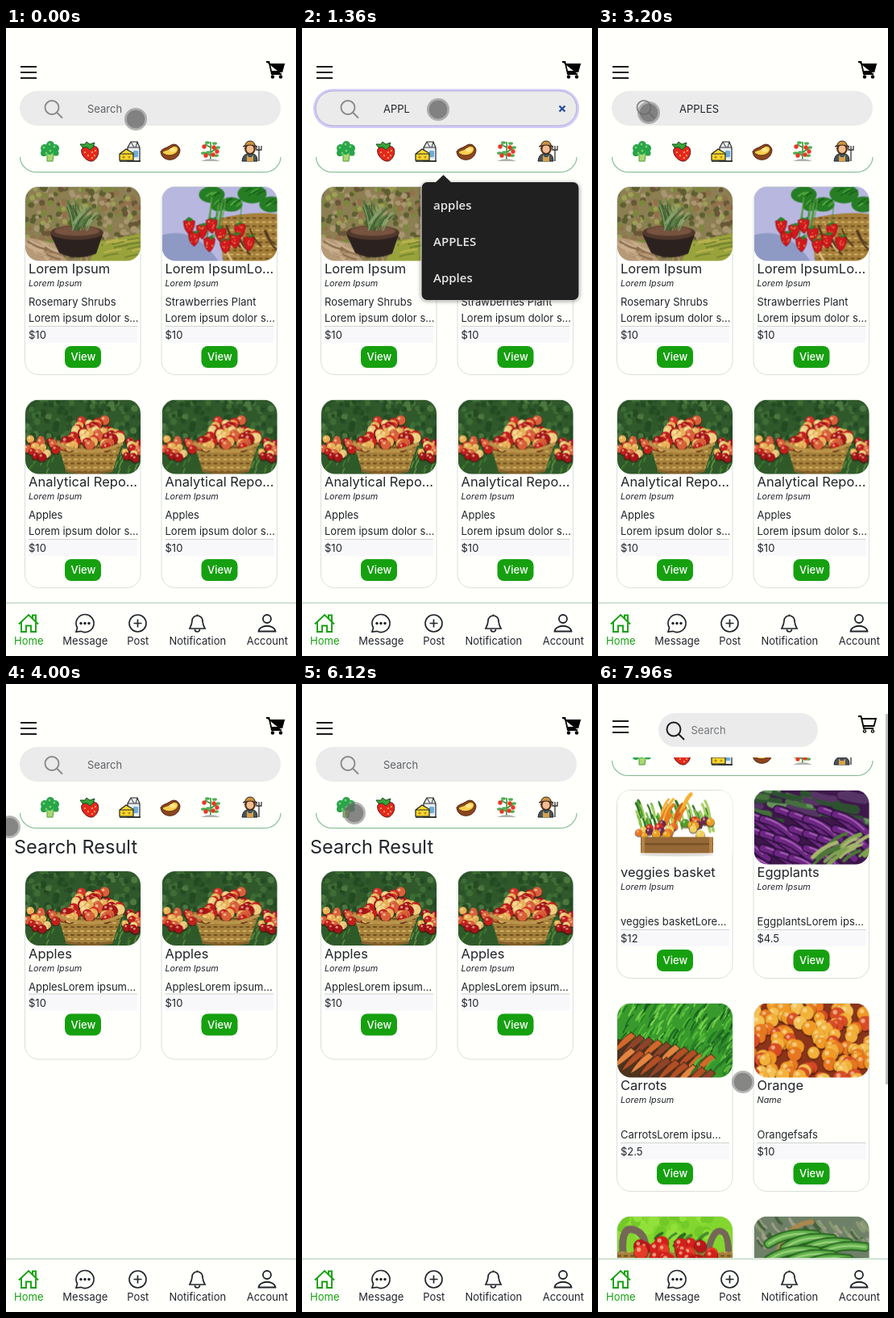
An HTML page with a canvas for the animation above (8 s loop, 360x778 px).

```html
<!DOCTYPE html>
<html lang="en">
<head>
<meta charset="utf-8">
<title>Market app search</title>
<style>
html, body { margin: 0; width: 100%; height: 100%; overflow: hidden; background: #fffffc; }
canvas { display: block; width: 360px; height: 778px; }
</style>
</head>
<body>
<canvas id="stage" width="360" height="778"></canvas>
<script>
const LOOP = 8000, BG = '#fffffc', INK = '#212529', GREEN = '#16a010';
const UI = 'Inter, Roboto, sans-serif';
const g = document.getElementById('stage').getContext('2d');

// ---- helpers
let seed = 1;
const rnd = () => (seed = (seed * 16807) % 2147483647) / 2147483647;
const pick = list => list[Math.floor(rnd() * list.length)];

function text(s, x, y, size, color = INK, style = '', family = UI) {
  g.font = `${style} ${size}px ${family}`;
  g.fillStyle = color;
  g.fillText(s, x, y);
}
function box(c, x, y, w, h, r, fill, stroke, lw = 1) {
  c.beginPath();
  c.roundRect(x, y, w, h, r);
  if (fill) { c.fillStyle = fill; c.fill(); }
  if (stroke) { c.strokeStyle = stroke; c.lineWidth = lw; c.stroke(); }
}
function shape(c, d, fill, stroke, lw = 1) {
  const p = new Path2D(d);
  if (fill) { c.fillStyle = fill; c.fill(p); }
  if (stroke) { c.strokeStyle = stroke; c.lineWidth = lw; c.stroke(p); }
}
function dot(c, x, y, r, fill, ry = r) {
  c.beginPath();
  c.ellipse(x, y, r, ry, 0, 0, 7);
  c.fillStyle = fill;
  c.fill();
}
function at(x, y, fn) {
  g.save();
  g.translate(x, y);
  fn(g);
  g.restore();
}

// ---- pictures, 143 x 92
function spots(c, n, x, y, w, h, r, cols) {
  for (let i = 0; i < n; i++) dot(c, x + rnd() * w, y + rnd() * h, r * (.7 + rnd() * .5), pick(cols));
}
function fruit(c, n, x, y, w, h, r, cols) {
  for (let i = 0; i < n; i++) {
    const px = x + rnd() * w, py = y + h * (i + rnd()) / n, s = r * (.85 + rnd() * .3);
    dot(c, px, py + 1, s + .6, 'rgba(50,10,5,.55)');
    dot(c, px, py, s, pick(cols));
    dot(c, px - s * .3, py - s * .35, s * .3, 'rgba(255,235,190,.6)');
  }
}
function streaks(c, n, x, y, w, h, dx, dy, lw, cols) {
  c.lineCap = 'round';
  for (let i = 0; i < n; i++) {
    const px = x + rnd() * w, py = y + rnd() * h, k = .6 + rnd() * .7;
    c.strokeStyle = pick(cols);
    c.lineWidth = lw * (.6 + rnd() * .6);
    c.beginPath();
    c.moveTo(px, py);
    c.quadraticCurveTo(px + dx * k * .4, py + dy * k * .7, px + dx * k, py + dy * k);
    c.stroke();
  }
}
function weave(c, d) {
  c.save();
  shape(c, d, '#a5803a');
  c.clip(new Path2D(d));
  for (let y = 38; y < 94; y += 5)
    for (let x = (y % 2) * 4; x < 146; x += 8) box(c, x, y, 5, 2, 1, y % 2 ? '#d0b064' : '#70501f');
  c.restore();
}
function picture(base, paint) {
  const cv = document.createElement('canvas');
  cv.width = 143; cv.height = 92;
  const c = cv.getContext('2d');
  seed = 4211;
  c.fillStyle = base;
  c.fillRect(0, 0, 143, 92);
  paint(c);
  return cv;
}

const REDS = ['#c41f1c', '#d8322a', '#a81418', '#e9b257', '#d9603a', '#f0cd7d'];
const PICS = {
  rosemary: picture('#8c7f53', c => {
    spots(c, 330, 0, 0, 143, 92, 3.4, ['#7c873d', '#a89670', '#5b5f31', '#93714c', '#9da055', '#695638']);
    shape(c, 'M0 62L34 70L52 92H0Z', '#b69a78');
    streaks(c, 18, 0, 64, 30, 26, 18, 8, 2, ['#c9b08e', '#8c6d4d']);
    shape(c, 'M92 68L143 58V92H80Z', '#99a33c');
    streaks(c, 16, 92, 66, 45, 24, 20, -4, 2, ['#c2b654', '#6d7f2d']);
    shape(c, 'M31 59Q64 70 96 59L88 83Q64 93 42 82Z', '#2b211f');
    dot(c, 64, 57, 33, '#51382c', 9);
    dot(c, 64, 55, 28, '#775340', 6);
    streaks(c, 34, 58, 44, 20, 11, -6, -25, 1.6, ['#587a43', '#7b9a5f', '#3f5e33']);
    streaks(c, 22, 58, 44, 20, 11, 14, -18, 1.5, ['#587a43', '#8ba36d', '#3f5e33']);
  }),
  berries: picture('#b7b7df', c => {
    shape(c, 'M0 60Q40 48 70 92H0Z', '#8e99c4');
    weave(c, 'M70 40Q110 30 143 34V92H76Z');
    streaks(c, 9, 78, 45, 55, 35, 16, 24, 2, ['#e0c28a', '#4c351d']);
    for (const [x, y, r] of [[62, 10, 16], [86, 22, 14], [112, 9, 18], [136, 22, 15], [70, 24, 10]]) {
      dot(c, x, y, r, '#267d24', r * .65);
      streaks(c, 5, x - r / 2, y - 3, r, 6, r * .5, -5, 1.5, ['#5db845', '#155819']);
    }
    streaks(c, 9, 40, 12, 70, 14, -6, 38, 1.5, ['#3e8f30', '#5da54d']);
    for (const [x, y] of [[34, 48], [50, 54], [40, 63], [59, 70], [73, 58], [79, 72], [97, 53], [108, 69], [62, 47], [91, 66]]) {
      shape(c, `M${x - 7} ${y - 5}Q${x} ${y - 10} ${x + 7} ${y - 5}Q${x + 6} ${y + 7} ${x} ${y + 11}Q${x - 7} ${y + 6} ${x - 7} ${y - 5}Z`, '#d0181d', '#8f1017', .8);
      spots(c, 6, x - 4, y - 4, 8, 10, .8, ['#f0a15d']);
      streaks(c, 3, x - 5, y - 7, 8, 2, 3, -2, 2, ['#2b8428']);
    }
  }),
  apples: picture('#30592b', c => {
    spots(c, 150, 0, 0, 143, 48, 3.5, ['#244a22', '#3d6c34', '#28522a', '#4c7840']);
    streaks(c, 90, 0, 52, 143, 40, 3, -7, 1.6, ['#437f2d', '#2b5e22', '#5c9140']);
    fruit(c, 18, 0, 48, 38, 24, 4.8, REDS);
    fruit(c, 13, 120, 50, 23, 24, 4.8, REDS);
    weave(c, 'M39 50Q80 62 121 51L108 89Q80 94 51 90Z');
    fruit(c, 17, 64, 25, 35, 16, 5.7, REDS);
    fruit(c, 36, 43, 37, 74, 22, 5.9, REDS);
    c.lineCap = 'butt';
    shape(c, 'M39 54Q80 74 121 54', null, '#bb944a', 4);
    shape(c, 'M50 88Q80 94 108 88', null, '#81602b', 3);
  }),
  basket: picture('#fffffc', c => {
    streaks(c, 60, 28, 28, 92, 24, -5, -16, 3, ['#4b9c2c', '#7cbc46', '#2d7425', '#a8cf63']);
    streaks(c, 12, 50, 28, 30, 14, 9, -18, 4, ['#e97d20', '#d65b1d', '#f2b238']);
    fruit(c, 24, 24, 37, 92, 20, 5, ['#d92c20', '#e9a022', '#4f9e2c', '#6d2a50', '#f0d05a', '#ed7426']);
    box(c, 29, 58, 90, 20, 1, '#956835');
    box(c, 29, 66, 90, 1.5, 0, '#66441f');
    box(c, 30, 58, 4, 20, 0, '#b58347');
    box(c, 114, 58, 4, 20, 0, '#b58347');
    dot(c, 74, 80, 46, 'rgba(90,80,70,.2)', 2);
  }),
  eggplants: picture('#3f174c', c => {
    streaks(c, 36, -20, -5, 143, 42, 28, 6, 9, ['#45703d', '#639358', '#2d5130', '#563466']);
    for (let i = 0; i < 22; i++) {
      const x = -25 + (i % 8) * 18, y = 24 + Math.floor(i / 8) * 24 + (i % 3) * 6;
      shape(c, `M${x} ${y}Q${x + 20} ${y + 4} ${x + 42} ${y + 25}`, null, '#270f35', 11);
      shape(c, `M${x} ${y}Q${x + 20} ${y + 4} ${x + 42} ${y + 25}`, null, '#6d2683', 8);
      shape(c, `M${x + 4} ${y - 1}Q${x + 20} ${y + 3} ${x + 36} ${y + 19}`, null, '#b370bd', 1.5);
    }
    streaks(c, 16, 72, 64, 70, 28, 26, -16, 5, ['#7fa251', '#4d7838', '#a5b66d']);
  }),
  carrots: picture('#389a2c', c => {
    streaks(c, 190, 0, 0, 143, 75, 8, -12, 2, ['#55bf36', '#227b25', '#7bd24e', '#185e20']);
    shape(c, 'M0 44L95 66L105 92H0Z', '#4c351f');
    for (let i = 0; i < 20; i++) {
      const x = 2 + (i % 10) * 11, y = 44 + (i % 10) * 3 + Math.floor(i / 10) * 19;
      shape(c, `M${x + 15} ${y - 8}L${x + 21} ${y - 3}Q${x + 2} ${y + 14} ${x - 9} ${y + 19}Q${x} ${y + 2} ${x + 15} ${y - 8}Z`, pick(['#d3682a', '#b24f25', '#e48540', '#8f442a']), '#3a2418');
    }
    streaks(c, 30, 92, 50, 50, 38, 10, -10, 3, ['#58b83a', '#27772a']);
  }),
  oranges: picture('#8a341a', c =>
    fruit(c, 120, -4, -5, 150, 102, 8.2, ['#f09a25', '#f3b13a', '#e77820', '#f5c052', '#d94b25'])),
  tomatoes: picture('#83d62d', c => {
    spots(c, 35, 0, 0, 143, 25, 6, ['#92e13b', '#72c927']);
    shape(c, 'M7 46Q4 8 24 18Q38 25 34 50', null, '#756658', 9);
    shape(c, 'M112 46Q120 8 134 22Q139 32 138 55', null, '#756658', 8);
    weave(c, 'M0 44H143V92H0Z');
    streaks(c, 12, 45, 25, 60, 15, 8, -6, 4, ['#296a22', '#498d2c']);
    fruit(c, 42, 28, 32, 90, 48, 8, ['#d3201b', '#b91717', '#e63a28']);
  }),
  cucumbers: picture('#6e8067', c => {
    streaks(c, 45, 0, 0, 143, 30, 8, 10, 4, ['#455f3b', '#a19f87', '#879a72']);
    shape(c, 'M18 92Q28 10 72 7', null, '#aa884d', 6);
    for (let i = 0; i < 14; i++) {
      const x = 18 + (i % 4) * 20, y = 26 + i * 5;
      const d = `M${x} ${y + 8}Q${x + 25} ${y - 9} ${x + 60} ${y - 3}`;
      shape(c, d, null, '#286222', 12);
      shape(c, d, null, '#62b24b', 8);
      shape(c, d, null, '#a3d585', 2);
    }
  })
};

// ---- small icons, centred on 0,0
const FOODS = [
  c => {
    shape(c, 'M-7 0L-3 4L-3 12H4L5 4L9 0Z', '#a9d86e', '#4b9b3e');
    for (const [x, y, r] of [[-6, -4, 5], [1, -8, 5], [7, -4, 5], [-7, 2, 4], [8, 2, 3.6], [0, -1, 5]]) dot(c, x, y, r, '#28a44a');
    for (const [x, y] of [[-7, -5], [0, -9], [6, -6], [1, -1], [-4, 2]]) dot(c, x, y, 1.5, '#72d26c');
  },
  c => {
    shape(c, 'M-10-3C-12 5-3 13 3 12C10 10 13-1 9-5C4-9-7-8-10-3Z', '#e5281f', '#5b1714');
    shape(c, 'M-9-5L-12-9L-6-9L-4-12L0-9L6-11L4-5L0-2L-3-5Z', '#37a338', '#174d1b');
    for (const [x, y] of [[-6, 1], [-2, 5], [3, 1], [7, -1], [3, 8], [6, 5]]) dot(c, x, y, .9, '#ffd268');
  },
  c => {
    shape(c, 'M-3-5L1-12H9L12-5V12H-3Z', '#e9eef0', '#222', 1.2);
    shape(c, 'M-3-5H12M1-12L5-5M9-12L7-5', null, '#333');
    box(c, 4, -1, 6, 8, 1, '#6baed6');
    shape(c, 'M-13 3L-5-3L4 2V11H-13Z', '#f6d82e', '#222', 1.2);
    shape(c, 'M-13 3H4', null, '#222');
    dot(c, -8, 7, 1.8, '#c48e13');
    dot(c, -1, 7, 1.5, '#c48e13');
    shape(c, 'M-13 12H13', null, '#222', 1.5);
  },
  c => {
    shape(c, 'M-12 0C-11 14 11 14 12-2C10-9 5-10 1-8C-5-4-10-4-12 0Z', '#8b461e', '#4a210f');
    shape(c, 'M-10 1C-6 7 8 6 10-3C8-8 4-7 1-5C-3-1-8-2-10 1Z', '#f6cf4d', '#6c3517');
    dot(c, 3, -2, 4, '#ffe58a', 2.5);
  },
  c => {
    shape(c, 'M0 11C-1 3 1-3 0-12M0 5L-8 1M0 1L8-4M0-5L-7-9', null, '#3c923d', 1.6);
    for (const [x, y] of [[-4, -11], [5, -10], [9, -5], [-9, 2], [7, 5], [-3, 1]]) dot(c, x, y, 3, '#4cae4c', 1.8);
    for (const [x, y] of [[-8, -6], [4, -5], [-6, 5], [8, 0], [3, 4]]) dot(c, x, y, 2.7, '#e63a25');
    shape(c, 'M-12 12Q0 6 12 12Z', '#aeb4b0');
  },
  c => {
    dot(c, -1, -4, 7, '#5d3420', 8);
    dot(c, -1, -3, 4.5, '#f0bd91', 5);
    shape(c, 'M-10-6Q-1-10 8-6L5-8Q4-13-1-13Q-6-13-7-8Z', '#c89342', '#34251c');
    shape(c, 'M-11 12Q-10 3-4 3H2Q8 3 8 12Z', '#46555c', '#222');
    shape(c, 'M-5 4V12H3V4L1 7H-3Z', '#d8a24a');
    shape(c, 'M10 12V-1M7-7V-2H13V-7M10-7V-1', null, '#333', 1.3);
  }
];

const NAV = [
  ['Home', 28, c => shape(c, 'M-12 1L0-10.5L12 1M-9-1V10.5H-3V3H3V10.5H9V-1M5-6V-10H9V-2', null, GREEN, 1.9)],
  ['Message', 98, c => {
    shape(c, 'M-11 10.5L-9.5 5.5A11 11 0 1 1 -5 9.8Z', null, INK, 1.7);
    for (const x of [-5, 0, 5]) dot(c, x, 0, 1.7, INK);
  }],
  ['Post', 163.5, c => shape(c, 'M10.5 0A10.5 10.5 0 1 1-10.5 0A10.5 10.5 0 1 1 10.5 0M-5 0H5M0-5V5', null, INK, 1.7)],
  ['Notification', 237.5, c => shape(c, 'M-9.5 6.5C-6-.5-7-1-6.5-3A6.5 6.5 0 0 1 6.5-3C7-1 6 0 9.5 6.5ZM-3 7.5A3 3 0 0 0 3 7.5M0-9.5V-11', null, INK, 1.7)],
  ['Account', 324, c => shape(c, 'M5-5.5A5 5 0 1 1-5-5.5A5 5 0 1 1 5-5.5M-10.5 10C-9.5 1 9.5 1 10.5 10Z', null, INK, 1.8)]
];

// ---- page contents: picture, title, subtitle, line 1, line 2, price
const L = 'Lorem Ipsum', DOLOR = 'Lorem ipsum dolor s…';
const REPORT = ['apples', 'Analytical Repo…', L, 'Apples', DOLOR, '$10'];
const FOUND = ['apples', 'Apples', L, 'ApplesLorem ipsum…', null, '$10'];
const PAGES = {
  home: [
    ['rosemary', L, L, 'Rosemary Shrubs', DOLOR, '$10'],
    ['berries', 'Lorem IpsumLo…', L, 'Strawberries Plant', DOLOR, '$10'],
    REPORT, REPORT
  ],
  result: [FOUND, FOUND],
  veg: [
    ['basket', 'veggies basket', L, '', 'veggies basketLore…', '$12'],
    ['eggplants', 'Eggplants', L, '', 'EggplantsLorem ips…', '$4.5'],
    ['carrots', 'Carrots', L, '', 'CarrotsLorem ipsu…', '$2.5'],
    ['oranges', 'Orange', 'Name', '', 'Orangefsafs', '$10'],
    ['tomatoes', 'Tomatoes', L, '', 'TomatoesLorem ip…', '$3'],
    ['cucumbers', 'Cucumbers', L, '', 'CucumbersLorem…', '$2']
  ]
};

function card([pic, title, sub, line1, line2, price], x, y) {
  box(g, x + .5, y + .5, 143.5, 233, 17, null, '#d9e0d9');
  g.save();
  g.beginPath();
  g.roundRect(x + 1, y + .5, 143, 92, 17);
  g.clip();
  g.drawImage(PICS[pic], x + 1, y + .5);
  g.restore();
  text(title, x + 5, y + 108, 16.5);
  text(sub, x + 5, y + 124, 10.8, INK, 'italic');
  text(line1, x + 5, y + 148, 13);
  if (line2 !== null) text(line2, x + 5, y + 168, 13);
  else y -= 21;
  box(g, x + 5, y + 174, 135, 20, 0, '#f8f8fb');
  box(g, x + 5, y + 173, 135, 1, 0, '#cfd3cf');
  text(price, x + 5, y + 189, 13);
  box(g, x + 50, y + 198, 45, 27, 8, GREEN);
  text('View', x + 57.5, y + 216, 13, '#fff', '500');
}

function categories(y) {
  FOODS.forEach((f, i) => at(54 + i * 50, y + 153, f));
  shape(g, `M17.5 ${y + 160}A20 19 0 0 0 37.5 ${y + 178.5}H321A20 19 0 0 0 341 ${y + 160}`, null, '#7cb98a', 1.1);
}

function lens(x, y, color) {
  at(x, y, c => shape(c, 'M8.5 0A8.5 8.5 0 1 1-8.5 0A8.5 8.5 0 1 1 8.5 0M6 6L13 13', null, color, 1.9));
}

function header(small, value, focus) {
  box(g, 0, 0, 360, small ? 91 : 125, 0, BG);
  const dy = small ? -2 : 0;
  for (const y of [48, 55, 62]) box(g, 18, y + dy - 1, 20, 2, 0, '#1b1b1b');
  at(334, 52 + dy, c => {
    shape(c, 'M-11-10H-7.5L-4 5H8M-7-7H11L8.5 2H-5', small ? null : '#000', '#000', 1.8);
    for (const x of [-3, 7]) {
      dot(c, x, 8.5, 2.2, '#000');
      if (small) dot(c, x, 8.5, .9, BG);
    }
  });
  if (small) {
    box(g, 75, 36, 198, 42, 21, '#ebebeb');
    lens(94, 56, '#1b1b1b');
    text('Search', 115.5, 62, 13, '#74777a');
    return;
  }
  if (focus) box(g, 14, 75.5, 330, 48.5, 24, '#d3cbfa');
  box(g, 17, 78, 324, 43, 21.5, '#ebebeb', focus && '#b3abd4');
  lens(57, 98.5, '#8a8a8a');
  text(value || 'Search', 101, 104.5, 13, value ? INK : '#5f6266');
  if (focus && value) shape(g, 'M319.5 96.5L326.5 103.5M326.5 96.5L319.5 103.5', null, '#234c9f', 2.2);
}

function popup(items) {
  const h = items.length * 45 + 11;
  g.save();
  g.shadowColor = 'rgba(0,0,0,.4)';
  g.shadowBlur = 5;
  g.shadowOffsetY = 1;
  box(g, 147.5, 190.5, 197, h + 1, 8, '#f4f4f4');
  g.restore();
  box(g, 148.5, 191, 195, h, 7, '#202020');
  shape(g, 'M165 192L175.5 182L186 192Z', '#202020');
  items.forEach((s, i) => text(s, 163, 225 + i * 45, 15, '#e6e6e6', '600', '"Open Sans", sans-serif'));
}

function navBar() {
  box(g, 0, 711, 360, 67, 0, BG);
  box(g, 0, 711.5, 360, 1.5, 0, '#c3dbc5');
  g.textAlign = 'center';
  for (const [name, x, icon] of NAV) {
    at(x, 737.5, icon);
    text(name, x + .3, 764, 13, name === 'Home' ? GREEN : INK);
  }
  g.textAlign = 'left';
}

// ---- timing
const TOUCH = [
  [0, 161, 113], [80, 161, 113], [240, 169, 101], [2300, 169, 101], [2660, 63, 105],
  [3560, 63, 105], [4000, 4, 177], [4080, -20, 186], [4440, -20, 186], [4840, 149, 102],
  [5200, 149, 102], [5210, 144, 103], [6070, 144, 103], [6120, 65, 160], [6200, 65, 160],
  [6420, 56, 155], [7100, 56, 155], [7560, 180, 558], [7600, 180, 558], [7950, 180, 493], [8000, 180, 493]
];
function touchAt(t) {
  const i = Math.max(1, TOUCH.findIndex(k => k[0] > t));
  const [t0, x0, y0] = TOUCH[i - 1], [t1, x1, y1] = TOUCH[i];
  const u = (t - t0) / (t1 - t0), e = u * u * (3 - 2 * u);
  return [x0 + (x1 - x0) * e, y0 + (y1 - y0) * e];
}

function draw(t) {
  const page = t < 3640 ? 'home' : t < 7080 ? 'result' : 'veg';
  const [tx, ty] = touchAt(t);
  const scroll = t >= 7600 ? 558 - ty : 0;
  const focus = t >= 240 && t < 2760;
  const typed = t >= 960 && page === 'home' ? 'APPLES'.slice(0, Math.floor((t - 960) / 130) + 1) : '';

  box(g, 0, 0, 360, 778, 0, BG);
  categories(-scroll);
  const top = page === 'result' ? 231.5 : 196;
  if (page === 'result') text('Search Result', 10, 210, 23.5);
  PAGES[page].forEach((item, i) => card(item, 23 + (i % 2) * 169.5, top - scroll + Math.floor(i / 2) * 264));
  header(scroll > 15, typed, focus);
  if (t >= 400 && t < 960) popup(['apples', 'OrangES', 'kales', 'APPLES', 'Oranges', 'ka']);
  else if (t >= 960 && t < 2240) popup(['apples', 'APPLES', 'Apples']);
  navBar();
  if (scroll > 0) box(g, 357, scroll * .57, 3, 459, 0, '#bdbdbd');
  dot(g, tx, ty, 14, 'rgba(120,120,120,.55)');
  dot(g, tx, ty, 11.3, 'rgba(95,95,95,.55)');
}

const start = performance.now();
(function tick() {
  draw((performance.now() - start) % LOOP);
  requestAnimationFrame(tick);
})();
</script>
</body>
</html>
```
